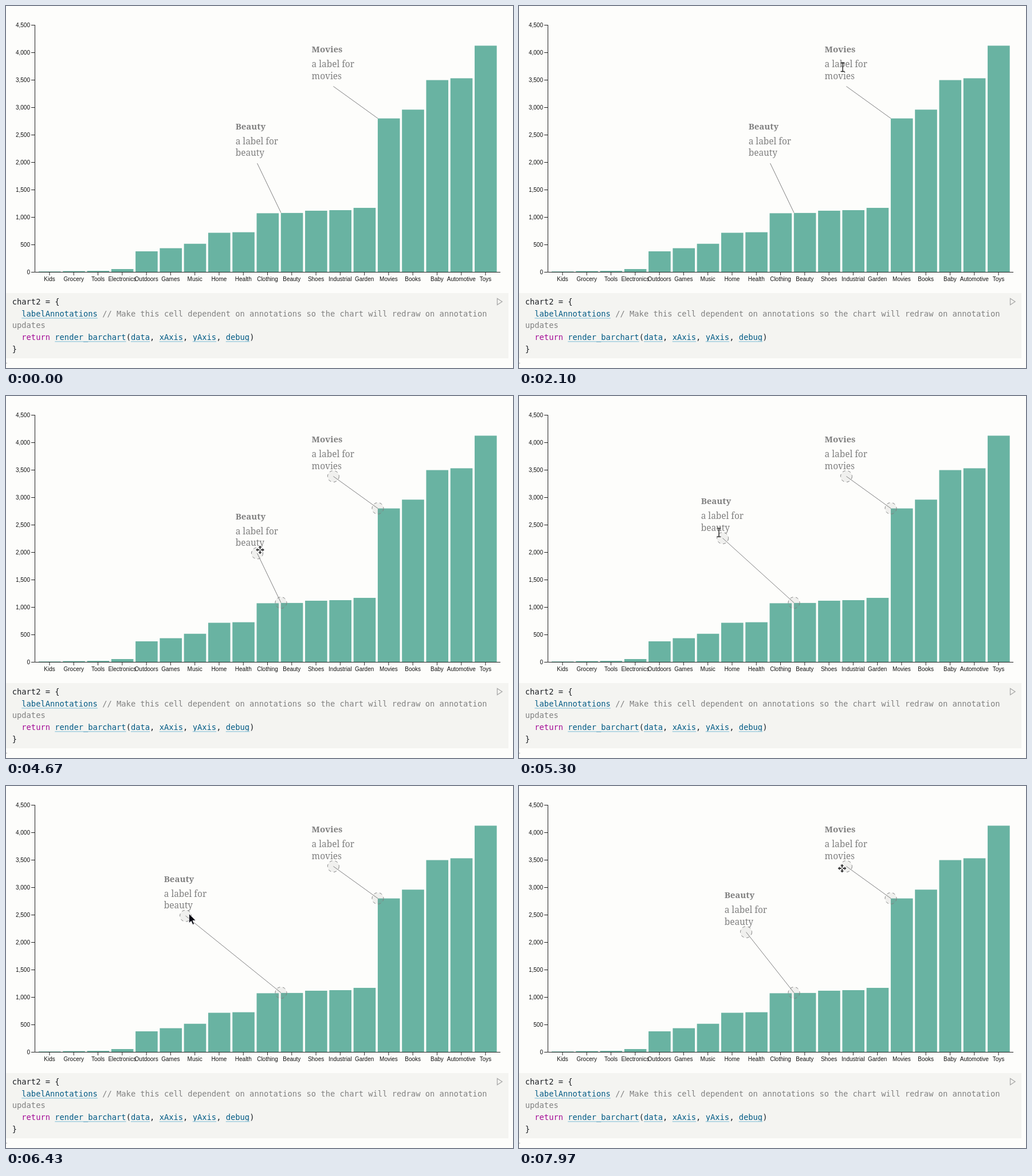
Write an HTML page that moves like this. It is 885x633 px and loops after 8000 ms.

```html
<!DOCTYPE html>
<html lang="en">
<head>
<meta charset="utf-8">
<title>Annotated bar chart</title>
<style>
html, body { margin: 0; width: 100%; height: 100%; overflow: hidden; background: #fdfdfb; }
svg { display: block; width: 885px; height: 633px; }
.axis { font: 10px "Liberation Sans", Arial, sans-serif; fill: #111; }
.rule { fill: none; stroke: #222; }
.bar { fill: #69b3a2; }
.note { font: 15.4px "Noto Serif", serif; fill: #808080; }
.title { font-weight: bold; font-size: 15px; }
.link { stroke: #808080; }
.handle { fill: #808080; fill-opacity: .1; stroke: #808080; stroke-dasharray: 5; }
.code { font: 13.77px "DejaVu Sans Mono", monospace; fill: #1b1e23; white-space: pre; }
.ref { fill: #005a85; }
.key { fill: #a30a96; }
.rem { fill: #808080; }
.under { fill: #a3cfdf; }
</style>
</head>
<body>
<svg viewBox="0 0 885 633">
  <g id="chart"></g>
  <g id="notes"></g>
  <rect y="502" width="877" height="114" fill="#f4f4f1"/>
  <g id="source"></g>
  <path d="M857.5 511.5V522.5L866 517Z" fill="none" stroke="#a9a9a9" stroke-width="1.3"/>
  <path d="M0 624.5H2" stroke="#aaa"/>
  <g id="cursor">
    <path id="arrow" d="M0 0V16.5L3.8 13L6.6 19.2L9.2 18L6.5 12H11.8Z" fill="#0a0a14" stroke="#fff" stroke-width=".8"/>
    <path id="beam" d="M-3.5 -7.5H3.5M0 -7.5V7.5M-3.5 7.5H3.5" fill="none" stroke="#222" stroke-width="1.4"/>
    <g id="move">
      <path d="M0 -7.5L3 -4H1V-1H4V-3L7.5 0L4 3V1H1V4H3L0 7.5L-3 4H-1V1H-4V3L-7.5 0L-4 -3V-1H-1V-4H-3Z" fill="#333" stroke="#fff" stroke-width="1.6" paint-order="stroke"/>
      <circle r="1.4" fill="#fff"/>
    </g>
  </g>
</svg>
<script>
const LOOP = 8000, BASE = 465, STEP = 42.28, UNIT = .096, RADIUS = 10, CHAR = 8.29;
const $ = id => document.getElementById(id);

function add(parent, tag, attrs, text) {
  const el = document.createElementNS("http://www.w3.org/2000/svg", tag);
  for (const k in attrs) el.setAttribute(k, attrs[k]);
  if (text !== undefined) el.textContent = text;
  parent.appendChild(el);
  return el;
}

// Chart
const sales = {
  Kids: 8, Grocery: 15, Tools: 19, Electronics: 52, Outdoors: 375, Games: 432, Music: 513,
  Home: 713, Health: 723, Clothing: 1069, Beauty: 1074, Shoes: 1115, Industrial: 1125,
  Garden: 1167, Movies: 2796, Books: 2956, Baby: 3494, Automotive: 3527, Toys: 4121
};
const chart = $("chart");
Object.entries(sales).forEach(([name, value], i) => {
  const x = 76 + i * STEP, height = value * UNIT;
  add(chart, "rect", { class: "bar", x: x - 19, y: BASE - height, width: 38.6, height });
  add(chart, "path", { class: "rule", d: `M${x} 465V471` });
  add(chart, "text", { class: "axis", x, y: 481, "text-anchor": "middle" }, name);
});
for (let value = 0; value <= 4500; value += 500) {
  const y = BASE - value * UNIT;
  add(chart, "path", { class: "rule", d: `M44 ${y + .5}H50` });
  add(chart, "text", { class: "axis", x: 42, y: y + 3.7, "text-anchor": "end" },
    value.toLocaleString("en-US"));
}
add(chart, "path", { class: "rule", d: "M50.5 33V465.5H863" });

// Annotations: the label hangs on its handle, the link ends at a bar
const handles = [];
function makeNote(name, tx, ty) {
  const root = add($("notes"), "g", {});
  const link = add(root, "line", { class: "link", x2: tx, y2: ty });
  const label = add(root, "g", { class: "note" });
  add(label, "text", { class: "title", x: -37.8, y: -59.2 }, name);
  add(label, "text", { x: -37.8, y: -33.5 }, "a label for");
  add(label, "text", { x: -37.8, y: -12.9 }, name.toLowerCase());
  handles.push(add(label, "circle", { class: "handle", r: RADIUS }));
  handles.push(add(root, "circle", { class: "handle", r: RADIUS, cx: tx, cy: ty }));
  return ([x, y]) => {
    label.setAttribute("transform", `translate(${x} ${y})`);
    link.setAttribute("x1", x);
    link.setAttribute("y1", y);
  };
}
const moviesSpot = [571.4, 140.5];
const placeBeauty = makeNote("Beauty", 480, 361.5);
makeNote("Movies", 649, 196.5)(moviesSpot);

// Code cell: *reference*, ^keyword^, ~comment~
const lines = [
  "chart2 = {",
  "  *labelAnnotations* ~// Make this cell dependent on annotations so the chart will redraw on annotation~",
  "~updates~",
  "  ^return^ *render_barchart*(*data*, *xAxis*, *yAxis*, *debug*)",
  "}"
];
const styles = { "*": "ref", "^": "key", "~": "rem" };
lines.forEach((line, i) => {
  const y = 522 + i * 20.64;
  const row = add($("source"), "text", { class: "code", x: 10.7, y });
  let col = 0;
  for (const part of line.match(/([*^~]).*?\1|[^*^~]+/g)) {
    const kind = styles[part[0]] || "";
    const text = kind ? part.slice(1, -1) : part;
    add(row, "tspan", { class: kind }, text);
    if (kind === "ref") {
      add($("source"), "rect", {
        class: "under", x: 10.7 + col * CHAR, y: Math.round(y) + 2, width: text.length * CHAR, height: 1.5
      });
    }
    col += text.length;
  }
});

// Motion: [time, x, y]
const drag = [
  [4870, 438.5, 275], [5560, 317, 224], [5730, 336.3, 208], [5930, 340, 162],
  [6200, 303, 196], [6430, 313.5, 227], [7250, 396.5, 255.5]
];
const roam = [
  [500, 520, 650], [2100, 565, 107], [2500, 572, 165], [3100, 106, 650],
  [4000, 106, 650], [4670, 443.5, 269]
];
const leave = [[7250, 399.5, 249.5], [7970, 564, 144]];

// Smooth curve through the keys that never overshoots, held at both ends
function at(track, t) {
  const last = track.length - 1;
  if (t <= track[0][0]) return track[0].slice(1);
  if (t >= track[last][0]) return track[last].slice(1);
  const i = track.findIndex(k => k[0] > t) - 1;
  const a = track[i], b = track[i + 1], span = b[0] - a[0], u = (t - a[0]) / span;
  const rise = (j, c) => (track[j + 1][c] - track[j][c]) / (track[j + 1][0] - track[j][0]);
  const slope = (j, c) => {
    if (j === 0 || j === last) return 0;
    const p = rise(j - 1, c), q = rise(j, c);
    return p * q > 0 ? 2 * p * q / (p + q) : 0;
  };
  return [1, 2].map(c =>
    a[c] + (b[c] - a[c]) * u * u * (3 - 2 * u) +
    span * u * (1 - u) * ((1 - u) * slope(i, c) - u * slope(i + 1, c)));
}

// While dragging, the pointer runs slightly ahead of the handle
function pointer(t) {
  if (t < 4870) return at(roam, t);
  if (t > 7250) return at(leave, t);
  const [x, y] = at(drag, t + 40);
  return [x + 3, y - 6];
}

function cursorKind(t, x, y, spots, debug) {
  if (t > 6400 && t < 7300) return "arrow";
  const offsets = spots.map(s => [x - s[0], y - s[1]]);
  if (debug && offsets.some(([dx, dy]) => Math.hypot(dx, dy) < RADIUS)) return "move";
  const onText = offsets.some(([dx, dy]) => Math.abs(dx) < 38 && dy > -73 && dy < -9);
  return onText ? "beam" : "arrow";
}

function draw(t) {
  const spot = at(drag, t), debug = t >= 3930, [x, y] = pointer(t);
  placeBeauty(spot);
  for (const h of handles) h.setAttribute("visibility", debug ? "visible" : "hidden");
  $("cursor").setAttribute("transform", `translate(${x} ${y})`);
  const kind = cursorKind(t, x, y, [spot, moviesSpot], debug);
  for (const id of ["arrow", "beam", "move"])
    $(id).setAttribute("visibility", id === kind ? "visible" : "hidden");
}

const start = performance.now();
function tick() {
  draw((performance.now() - start) % LOOP);
  requestAnimationFrame(tick);
}
tick();
</script>
</body>
</html>
```
